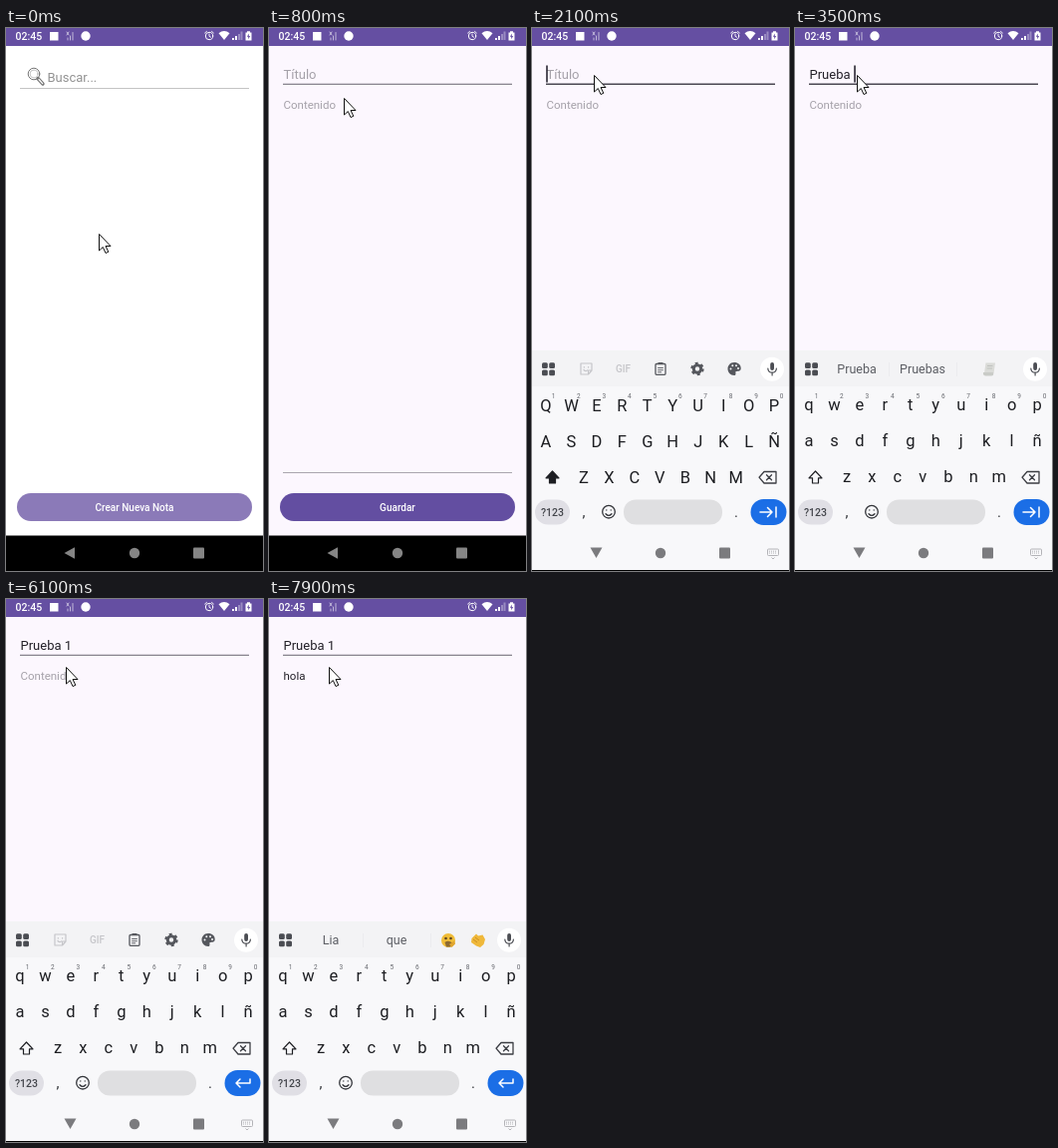
Write an HTML page that moves like this. It is 258 px wide and 544 px high and loops after 8 s.

```html
<!DOCTYPE html>
<html lang="es">
<head>
<meta charset="utf-8">
<title>Notas</title>
<style>
  html, body { margin: 0; width: 100%; height: 100%; overflow: hidden; background: #fff; }
  svg { display: block; width: 258px; height: 544px; font-family: Roboto, "Noto Sans", sans-serif; }
  .mid { text-anchor: middle; }
  .bold { font-weight: 500; }
  .line { fill: none; stroke-linecap: round; stroke-linejoin: round; }
</style>
</head>
<body>
<svg viewBox="0 0 258 544">
  <!-- note list -->
  <g id="home">
    <rect width="258" height="544" fill="#fff"/>
    <path d="M14 60.5H244" stroke="#c4c4c4"/>
    <g class="line" stroke="#777">
      <circle cx="28" cy="46" r="5.8"/>
      <circle cx="28" cy="46" r="3.9" stroke="#aaa" stroke-width=".7"/>
      <path d="M32 50.5L37 56" stroke-width="3.4"/>
      <path d="M33 51.5L36.7 55.6" stroke="#fff" stroke-width="1.2"/>
    </g>
    <text x="41.5" y="53.5" font-size="13" fill="#929292">Buscar...</text>
    <rect x="11" y="466" width="236" height="28" rx="14" fill="#8b7ab8"/>
    <text class="mid bold" x="129" y="484" font-size="10" fill="#fff">Crear Nueva Nota</text>
  </g>

  <!-- note editor -->
  <g id="editor">
    <rect width="258" height="544" fill="#fcf7fe"/>
    <path id="titleLine" d="M14 56.2H244"/>
    <text id="title" x="14.5" y="51" font-size="13"></text>
    <text id="body" x="14.5" y="81" font-size="11.5"></text>
    <path d="M14 445.5H244" stroke="#aaa6ae"/>
    <rect x="11" y="466" width="236" height="28" rx="14" fill="#634ea1"/>
    <text class="mid bold" x="129" y="484" font-size="10" fill="#fff">Guardar</text>
    <rect id="caret" width="1.6" fill="#2a2632"/>
  </g>

  <!-- status bar -->
  <rect width="258" height="18" fill="#654fa2"/>
  <g fill="#fff">
    <text class="bold" x="9.5" y="12" font-size="10.5">02:45</text>
    <rect x="44" y="4" width="8.5" height="8.5"/>
    <circle cx="80" cy="8" r="4.7"/>
    <path d="M213.5 5.2Q219 1 224.500 5.2L219 12Z"/>
    <path d="M227 12H229V10H227ZM230 12H232V8H230Z"/>
    <path d="M233 12H235V6H233ZM235.5 12H237.5V3.5H235.5Z" opacity=".35"/>
    <path d="M240.5 4.5H242V3.2H245V4.5H246.5V12.5H240.5Z"/>
    <path d="M243.8 5.6L241.9 8.8H243.2V11.3L245.2 8H243.8Z" fill="#654fa2"/>
  </g>
  <g class="line" stroke="#fff">
    <path d="M61 4L63 7M63 4L61 7M62 12V10M64.5 12V8M67 12V4.5" opacity=".6"/>
    <circle cx="204" cy="8" r="3.7"/>
    <path d="M204 6V8.3L205.6 9.2M199.6 5L201.5 3.4M208.4 5L206.5 3.4" stroke-width=".9"/>
  </g>

  <!-- dark navigation bar -->
  <g id="darkNav">
    <rect y="508.5" width="258" height="36"/>
    <g fill="#858585">
      <path d="M58.5 526L69 520.2V531.8Z"/>
      <circle cx="129" cy="526" r="5.2"/>
      <rect x="188" y="520.5" width="11" height="11" rx="1"/>
    </g>
  </g>

  <g id="keyboard">
    <rect y="323" width="258" height="221" fill="#f8f8fa"/>
    <rect y="323" width="258" height="36" fill="#f3f3f5"/>
    <g fill="#4b4d53">
      <rect x="10" y="335.2" width="5.8" height="5.8" rx="1.5"/>
      <rect x="17.2" y="335.2" width="5.8" height="5.8" rx="1.5"/>
      <rect x="10" y="342.4" width="5.8" height="5.8" rx="1.5"/>
      <rect x="17.2" y="342.4" width="5.8" height="5.8" rx="1.5"/>
    </g>

    <g id="tools" transform="translate(0 -.5)">
      <g class="line" stroke="#c6c6ca" stroke-width="1.2">
        <path d="M49 336.5H60V343.5L56.5 347.5H49ZM60 343.5H56.5V347.5"/>
        <path d="M52.3 340V340.6M56.6 340V340.6M52 343Q54 345 55.5 343.4"/>
      </g>
      <text class="mid bold" x="91.5" y="345.7" font-size="10" fill="#c6c6ca">GIF</text>
      <g class="line" stroke="#55575d" stroke-width="1.3">
        <rect x="124" y="337" width="10" height="10.8" rx="1"/>
        <path d="M126.6 341H131.4M126.6 343.2H131.4M126.6 345.3H129.6" stroke-width=".9"/>
        <path d="M127.3 336.6H130.7" stroke-width="2"/>
      </g>
      <g fill="none" stroke="#55575d">
        <circle cx="166" cy="342" r="3.7" stroke-width="3"/>
        <circle cx="166" cy="342" r="5.6" stroke-width="2.2" stroke-dasharray="2.9 2.964"/>
      </g>
      <path d="M203 335.5C198.5 335.5 196.5 339 196.5 342S199 348.5 203 348.5C205.5 348.5 204 345.5 204.5 344.7C205 343.8 209.7 345.5 209.7 341.5C209.7 338 207 335.5 203 335.5Z" fill="#55575d"/>
      <g fill="#f3f3f5">
        <circle cx="199.5" cy="342" r="1"/><circle cx="201.3" cy="338.8" r="1"/>
        <circle cx="205" cy="338.8" r="1"/><circle cx="207" cy="341.6" r="1"/>
      </g>
    </g>

    <g id="hints" font-size="12.5" fill="#5c5e64">
      <path d="M94.5 335V349M162.5 335V349" stroke="#ebebee"/>
      <text class="mid" id="hintA" x="62" y="346.3"></text>
      <text class="mid" id="hintB" x="128" y="346.3"></text>
      <g id="paper">
        <path d="M191.5 335.5H201L199.5 346H190Z" fill="#dadbd8"/>
        <path d="M189 345H199Q200 348.5 197 348.5H191Q188.5 348 189 345Z" fill="#c9cbc7"/>
        <path d="M193 338.5H198.5M192.7 341H198" stroke="#b9bbb8" stroke-width=".8"/>
      </g>
      <g id="emoji">
        <circle cx="180" cy="342" r="7" fill="#f0bd38"/>
        <circle cx="177.5" cy="340" r="1.3" fill="#5b4320"/>
        <circle cx="182.5" cy="340" r="1.3" fill="#5b4320"/>
        <path d="M176.5 344Q180 341.5 184 344.5L182.5 348.5H178Z" fill="#8c6a31"/>
        <path d="M181 346L186 342.5L187 345.5L183.5 349Z" fill="#e0a52e"/>
        <path d="M203.5 340L208 335.5L210 337.5L214.5 336.5L217 341L215.5 346L212 349L208 347.5L203 344Z" fill="#efb83a"/>
        <path d="M205 341L209 344M207 339L211 342" stroke="#c98b22" stroke-width=".9"/>
      </g>
    </g>

    <circle cx="241" cy="341.7" r="12" fill="#fff"/>
    <rect x="239.2" y="335" width="3.8" height="8" rx="1.9" fill="#4b4d53"/>
    <path class="line" d="M236.8 341Q237 345.2 241.1 345.2T245.4 341M241.1 345.5V348" stroke="#4b4d53" stroke-width="1.2"/>

    <g class="mid" fill="#1d1e22">
      <g id="letters" font-size="16.5"></g>
      <g id="digits" font-size="6.5" fill="#66686e"></g>
    </g>
    <path id="shift" class="line" d="M20.5 444L27 450.8H23.5V456H17.5V450.8H14Z" stroke="#1d1e22" stroke-width="1.2"/>
    <path class="line" d="M233 444.5H245V456H233L228 450.2ZM235.5 447.7L240.5 452.8M240.5 447.7L235.5 452.8" stroke="#3b3d43" stroke-width="1.3"/>

    <rect x="3" y="472.5" width="35" height="25" rx="12.5" fill="#e0dfe5"/>
    <text class="mid bold" x="20.5" y="489" font-size="10.5" fill="#44464c">?123</text>
    <text class="mid" x="52" y="490" font-size="15" fill="#33353a">,</text>
    <text class="mid" x="205" y="490" font-size="15" fill="#33353a">.</text>
    <g class="line" stroke="#33353a" stroke-width="1.3">
      <circle cx="77" cy="484.7" r="6.3"/>
      <path d="M74.8 482.8V483.1M79.2 482.8V483.1M74 486.7Q77 490 80 486.700"/>
    </g>
    <rect x="92" y="472.5" width="99" height="25" rx="12" fill="#dfdfe1"/>
    <rect x="219.5" y="472" width="36" height="26" rx="13" fill="#1b6ee6"/>
    <path id="enter" class="line" stroke="#fff" stroke-width="1.5"/>

    <g fill="#7b7b7e">
      <path d="M58.5 520.5H70.5L64.5 531Z"/>
      <circle cx="129" cy="526" r="5.2"/>
      <rect x="188" y="520.5" width="11" height="11" rx="1"/>
    </g>
    <g fill="none" stroke="#b4b4b8">
      <rect x="236.5" y="522" width="11" height="6.5" rx="1"/>
      <path d="M238 524.2H246M238 526H246" stroke-dasharray="1 1"/>
      <path d="M240.5 530.5L242 532L243.5 530.5"/>
    </g>
  </g>

  <rect y="543" width="258" height="1"/>
  <path id="pointer" d="M.5 .5V17L4.300 13.500L7 19.500L9.800 18.300L7 12.500H12Z" fill="#fff" stroke="#111" stroke-linejoin="round"/>
</svg>

<script>
const $ = id => document.getElementById(id);
const LOOP = 8000, STEP = 100;
const FOCUS_TITLE = 1700, FOCUS_BODY = 5600;

// [time, text so far]
const titleTyping = [[0, ''], [2600, 'P'], [2700, 'Pr'], [2900, 'Pru'], [3000, 'Prue'],
  [3100, 'Prueb'], [3300, 'Prueba'], [3400, 'Prueba '], [4000, 'Prueba 1']];
const bodyTyping = [[0, ''], [6600, 'h'], [6800, 'ho'], [7100, 'hol'], [7300, 'hola']];
// [time, x, y]
const path = [[0, 93, 206], [800, 75, 70], [1500, 62, 47], [5000, 62, 47], [5500, 60, 68], [LOOP, 60, 68]];

const last = (list, t) => list.filter(e => e[0] <= t).pop();
const clamp = v => Math.max(0, Math.min(1, v));
const show = (id, on) => $(id).setAttribute('visibility', on ? 'visible' : 'hidden');
const set = (id, attrs) => { for (const k in attrs) $(id).setAttribute(k, attrs[k]); };

function label(group, x, y, text) {
  const el = document.createElementNS('http://www.w3.org/2000/svg', 'text');
  el.setAttribute('x', x);
  el.setAttribute('y', y);
  el.textContent = text;
  $(group).append(el);
  return el;
}

const letters = [];
[['qwertyuiop', 14, 383], ['asdfghjklñ', 14, 418.7], ['zxcvbnm', 52, 455]].forEach(([row, x0, y]) =>
  [...row].forEach((c, i) => letters.push([label('letters', x0 + 25.45 * i, y, c), c])));
for (let i = 0; i < 10; i++) label('digits', 21.5 + 25.45 * i, 371, (i + 1) % 10);

function pointerAt(t) {
  const i = path.findIndex(p => p[0] > t);
  const [a, b] = [path[i - 1], path[i]];
  const u = (t - a[0]) / (b[0] - a[0]), k = u * u * (3 - 2 * u);
  return [a[1] + (b[1] - a[1]) * k, a[2] + (b[2] - a[2]) * k];
}

function field(id, text, hint) {
  $(id).textContent = text || hint;
  $(id).setAttribute('fill', text ? '#242129' : '#a5a1a9');
}

function drawCaret(t) {
  const inBody = t >= FOCUS_BODY;
  const [stamp, text] = last(inBody ? bodyTyping : titleTyping, t);
  const since = t - Math.max(stamp, inBody ? FOCUS_BODY : FOCUS_TITLE);
  show('caret', since >= 0 && since % 1000 < 500);
  const el = $(inBody ? 'body' : 'title');
  const space = text.endsWith(' ') ? 3.2 : 0;
  const width = text ? el.getSubStringLength(0, text.trim().length) + space + 0.8 : 0;
  set('caret', { x: 14.2 + width, y: inBody ? 70 : 37.5, height: inBody ? 14 : 17 });
}

function draw(t) {
  $('editor').setAttribute('opacity', clamp((t - 200) / 300));
  const title = last(titleTyping, t)[1], body = last(bodyTyping, t)[1];
  field('title', title, 'Título');
  field('body', body, 'Contenido');
  const active = t >= FOCUS_TITLE && t < FOCUS_BODY;
  set('titleLine', { stroke: active ? '#4b4752' : '#66626c', 'stroke-width': active ? 1.5 : 1.1 });
  drawCaret(t);

  const rise = 1 - Math.pow(1 - clamp((t - 1600) / 300), 2);
  $('keyboard').setAttribute('transform', `translate(0 ${221 * (1 - rise)})`);
  show('keyboard', rise > 0);
  show('darkNav', rise === 0);

  const caps = !title;
  letters.forEach(([el, c]) => el.textContent = caps ? c.toUpperCase() : c);
  set('letters', { transform: `translate(0 ${caps ? 1 : 0})` });
  $('shift').style.fill = caps ? '#1d1e22' : 'none';

  const word = title && t < 4000, next = body === 'hola';
  show('tools', rise > 0 && !word && !next);
  show('hints', word || next);
  show('paper', word);
  show('emoji', next);
  $('hintA').textContent = next ? 'Lia' : 'Prueba';
  $('hintB').textContent = next ? 'que' : 'Pruebas';
  $('enter').setAttribute('d', t < FOCUS_BODY
    ? 'M229 485H241M236.5 480.5L241 485L236.5 489.5M245 480V490'
    : 'M245 481V485H231M235 481L231 485L235 489');

  $('pointer').setAttribute('transform', `translate(${pointerAt(t)})`);
}

function frame(now) {
  draw(Math.floor(now % LOOP / STEP) * STEP);
  requestAnimationFrame(frame);
}
requestAnimationFrame(frame);
</script>
</body>
</html>
```
